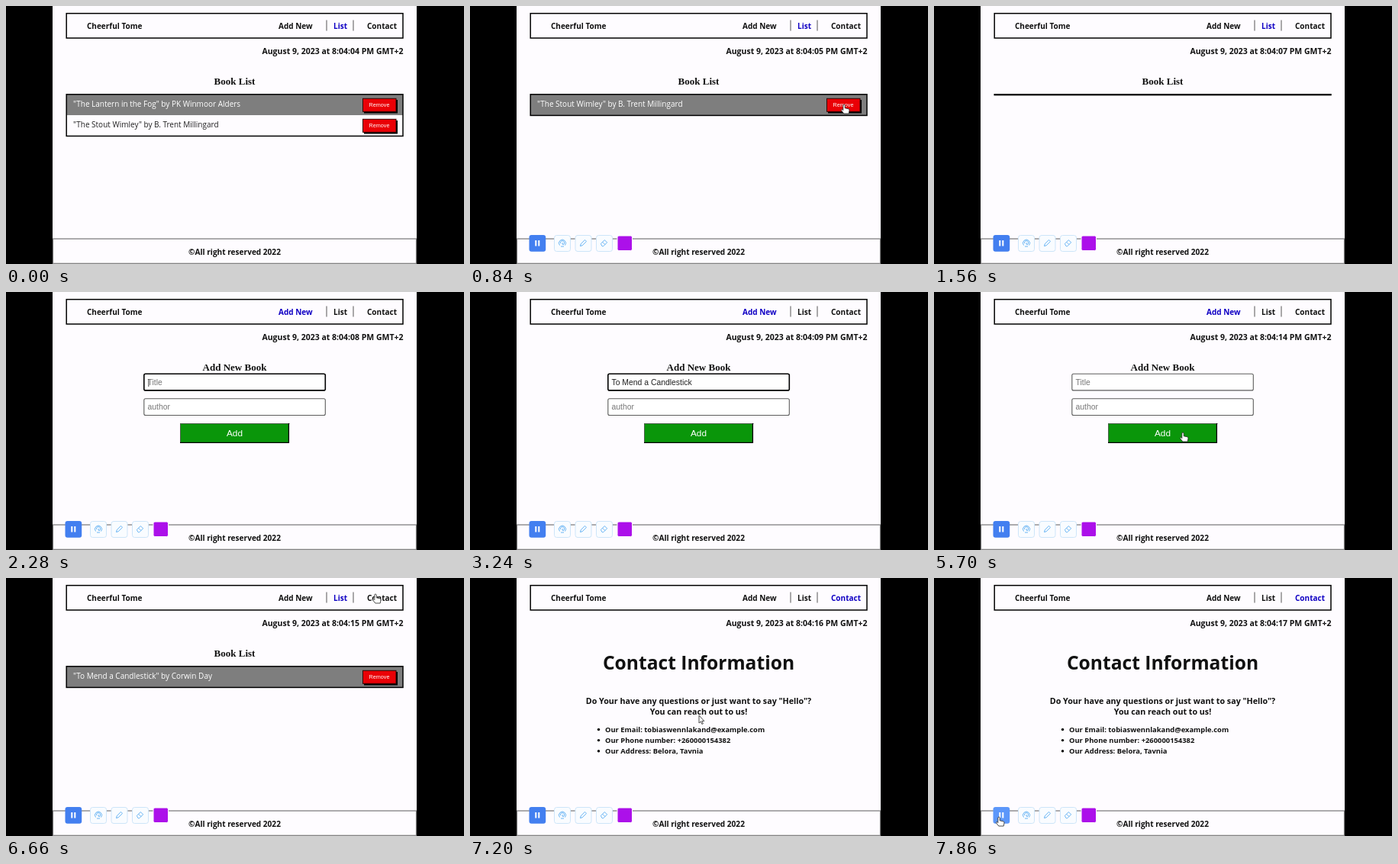
Recreate the animation shown at these times as an HTML page. Size 600x338 px, loop 7920 ms.

```html
<!DOCTYPE html>
<html lang="en">
<head>
<meta charset="utf-8">
<title>Book list</title>
<style>
html, body { margin: 0; width: 100%; height: 100%; overflow: hidden; background: #000; }
svg { display: block; width: 600px; height: 338px; }
text { font: 10px "Open Sans", "Noto Sans", sans-serif; fill: #111; white-space: pre; }
.b { font-weight: 700; }
.h { font: 700 13px "Liberation Serif", serif; }
.s { font: 10.4px "Liberation Sans", sans-serif; }
.m { text-anchor: middle; }
.e { text-anchor: end; }
</style>
</head>
<body>
<svg viewBox="0 0 600 338">
  <rect x="61" width="477" height="338" fill="#fefcff"/>
  <rect x="79.2" y="9.7" width="440.8" height="32.3" fill="none" stroke="#000" stroke-width="1.5"/>
  <path d="M420 18.5v14M455 18.5v14" stroke="#555"/>
  <text class="b" x="106" y="30">Cheerful Tome</text>
  <rect x="61.5" y="305" width="476" height="32.3" fill="none" stroke="#777" stroke-width="1.2"/>
  <text class="b m" x="299.5" y="325.5" style="font-size:10.1px">©All right reserved 2022</text>
  <g id="view"></g>
  <g id="tools">
    <rect id="pause" x="77.5" y="300" width="21.7" height="21.7" rx="3"/>
    <path d="M86.3 307v7.5M90.3 307v7.5" stroke="#fff" stroke-width="2"/>
    <g fill="#f9fcff" stroke="#cde5f9">
      <rect x="110.5" y="300.5" width="21" height="21" rx="3"/>
      <rect x="138" y="300.5" width="21" height="21" rx="3"/>
      <rect x="165.5" y="300.5" width="21" height="21" rx="3"/>
    </g>
    <g fill="none" stroke="#58acf2" stroke-width=".9">
      <path d="M117.5 313.5a4.5 4.5 0 1 1 7 0M118.5 311a2.6 2.6 0 1 1 5 0q-1 3-2.5 1v-2M119 315h4"/>
      <path d="M144.500 314.500l.7-2.800 5.300-5.300 2 2-5.300 5.300z"/>
      <path d="M171.300 311.500l5-5 3.300 3.300-5 5h-1.300zM173.600 309.200l3.300 3.300"/>
    </g>
    <rect x="193" y="301" width="19.500" height="19.500" rx="2" fill="#ac10ea" stroke="#fff"/>
  </g>
  <g id="cursor" fill="#fff" stroke="#222" stroke-width=".8" stroke-linejoin="round"><path id="shape"/></g>
</svg>
<script>
const LOOP = 7920, STEP = 60;
const $ = id => document.getElementById(id);
const view = $("view"), tools = $("tools"), pause = $("pause"), cursor = $("cursor"), shape = $("shape");

const TITLE = "To Mend a Candlestick", AUTHOR = "Corwin Day";
const entry = (title, author) => `"${title}" by ${author}`;
const FIRST = [entry("The Lantern in the Fog", "PK Winmoor Alders"), entry("The Stout Wimley", "B. Trent Millingard")];
const ADDED = [entry(TITLE, AUTHOR)];

const HAND = "M-1.2 .8q1.2-1.8 2.4 0v4l4.6 1q1.3.4 1.2 2l-.8 4.2h-6.4l-3.500-4.400q.2-1.500 1.700-.8l.8.8z";
const ARROW = "M0 0v10l2.300-2 1.600 3.500 1.500-.7-1.600-3.400h3z";

// Visible pointer strokes: time, x, y
const strokes = [
  [[60, 88, 311], [480, 490, 129], [1260, 490, 129], [1440, 470, 92]],
  [[1740, 400, 60], [1800, 380, 25], [1980, 380, 25], [2160, 300, 118], [2280, 300, 118]],
  [[3360, 300, 118], [3540, 300, 150], [3660, 300, 150]],
  [[5040, 300, 150], [5280, 326, 184], [5700, 326, 184], [5880, 436, 23], [6120, 436, 23], [6600, 484, 21],
   [6780, 484, 21], [7200, 300, 180], [7500, 76, 314], [7620, 85, 313], [LOOP, 85, 313]]
];

function pointer(t) {
  const s = strokes.find(s => t >= s[0][0] && t < s[s.length - 1][0]);
  if (!s) return null;
  const i = s.findIndex(p => p[0] > t), [a, x, y] = s[i - 1], [b, u, v] = s[i];
  const k = (t - a) / (b - a), e = k * k * (3 - 2 * k);
  return [x + (u - x) * e, y + (v - y) * e];
}

const text = (x, y, str, cls = "", style = "") => `<text x="${x}" y="${y}" class="${cls}" style="${style}">${str}</text>`;
const rect = (x, y, w, h, attrs) => `<rect x="${x}" y="${y}" width="${w}" height="${h}" ${attrs}/>`;

function list(books) {
  let out = text(299.5, 103, "Book List", "h m");
  books.forEach((book, i) => {
    const y = 116 + 27 * i;
    if (i % 2 == 0) out += rect(79, y, 441, 27, 'fill="#7e7e7e"');
    out += text(88, y + 16.2, book, "", i % 2 ? "fill:#222" : "fill:#fff")
      + rect(469, y + 7, 44, 17.5, "")
      + rect(467.5, y + 5.3, 43.5, 17, 'fill="#ea0006" stroke="#300"')
      + text(489, y + 16.2, "Remove", "s m", "font-size:7.2px;fill:#fff");
  });
  return out + rect(79.2, 115.8, 440.8, books.length ? 27 * books.length + .6 : .8,
    'fill="none" stroke="#000" stroke-width="1.5"');
}

function field(y, value, hint, focused, caret) {
  const shown = value + (focused && caret ? "|" : "");
  return rect(180.8, y, 237.5, 21.7, `rx="2" fill="#fff" stroke="${focused ? "#000" : "#5c5c5c"}" stroke-width="${focused ? 1.6 : 1.1}"`)
    + (value ? "" : text(185.5, y + 14.3, hint, "s", "fill:#777"))
    + text(185.5, y + 14.3, shown, "s", "fill:#222");
}

function form(t) {
  const open = t < 5460, caret = (t + 120) % 600 < 300;
  const typed = (str, start, pace) => open ? str.slice(0, Math.max(0, Math.floor((t - start) / pace))) : "";
  return text(299.5, 103, "Add New Book", "h m")
    + field(107.2, typed(TITLE, 2280, 40), "Title", t >= 2160 && t < 3540, caret)
    + field(139.8, typed(AUTHOR, 3720, 100), "author", t >= 3540 && open, caret)
    + rect(228, 172, 143, 26, 'fill="#0a960a"')
    + '<path d="M228.500 198v-25.500h143" fill="none" stroke="#4b604b"/>'
    + '<path d="M228 197.400h142.400v-25.400" fill="none" stroke="#000" stroke-width="1.300"/>'
    + text(299.5, 189, "Add", "s m", "font-size:11.8px;fill:#fff");
}

function contact() {
  const lines = ["Our Email: tobiaswennlakand@example.com", "Our Phone number: +260000154382", "Our Address: Belora, Tavnia"];
  return text(299.5, 119.5, "Contact Information", "b m", "font-size:24.6px")
    + text(299.5, 164.5, 'Do Your have any questions or just want to say "Hello"?', "b m", "font-size:10.7px")
    + text(299.5, 179, "You can reach out to us!", "b m", "font-size:10.7px")
    + lines.map((line, i) => `<circle cx="168.500" cy="${198.5 + 14.1 * i}" r="1.700"/>`
      + text(177, 201.5 + 14.1 * i, line, "b", "font-size:9.4px")).join("");
}

const pages = ["Add New", "List", "Contact"], tabX = [357, 429, 473];

function pageAt(t) {
  if (t < 1860) return 1;
  if (t < 5940) return 0;
  return t < 6780 ? 1 : 2;
}

function clickable(page, t, x, y) {
  const inside = (l, top, r, bottom) => x >= l && x <= r && y >= top && y <= bottom;
  return inside(357, 18, 403, 34) || inside(429, 18, 447, 34) || inside(473, 18, 511, 34)
    || inside(77, 300, 213, 322)
    || page == 0 && inside(228, 172, 371, 198)
    || page == 1 && t < 1260 && inside(467, 121, 511, 139);
}

function draw(t) {
  const page = pageAt(t);
  const seconds = String(4 + Math.floor(t / 600 + .55)).padStart(2, "0");
  const books = t > 5000 ? ADDED : FIRST.slice(t < 660 ? 0 : t < 1260 ? 1 : 2);
  view.innerHTML = pages.map((name, i) => text(tabX[i], 30, name, "b", i == page ? "fill:#1000c4" : "")).join("")
    + text(520.5, 63, `August 9, 2023 at 8:04:${seconds} PM GMT+2`, "b e", "font-size:10.5px")
    + [form, () => list(books), contact][page](t);

  const at = pointer(t);
  tools.style.display = t < 60 ? "none" : "";
  pause.setAttribute("fill", at && at[0] < 99 && at[0] > 77 && at[1] > 300 ? "#5c97fa" : "#437ff0");
  cursor.style.display = at ? "" : "none";
  if (at) {
    cursor.setAttribute("transform", `translate(${at})`);
    shape.setAttribute("d", clickable(page, t, ...at) ? HAND : ARROW);
  }
}

const start = performance.now();
let last = -1;
function tick() {
  const t = Math.floor((performance.now() - start) % LOOP / STEP) * STEP;
  if (t != last) draw(last = t);
  requestAnimationFrame(tick);
}
tick();
</script>
</body>
</html>
```
